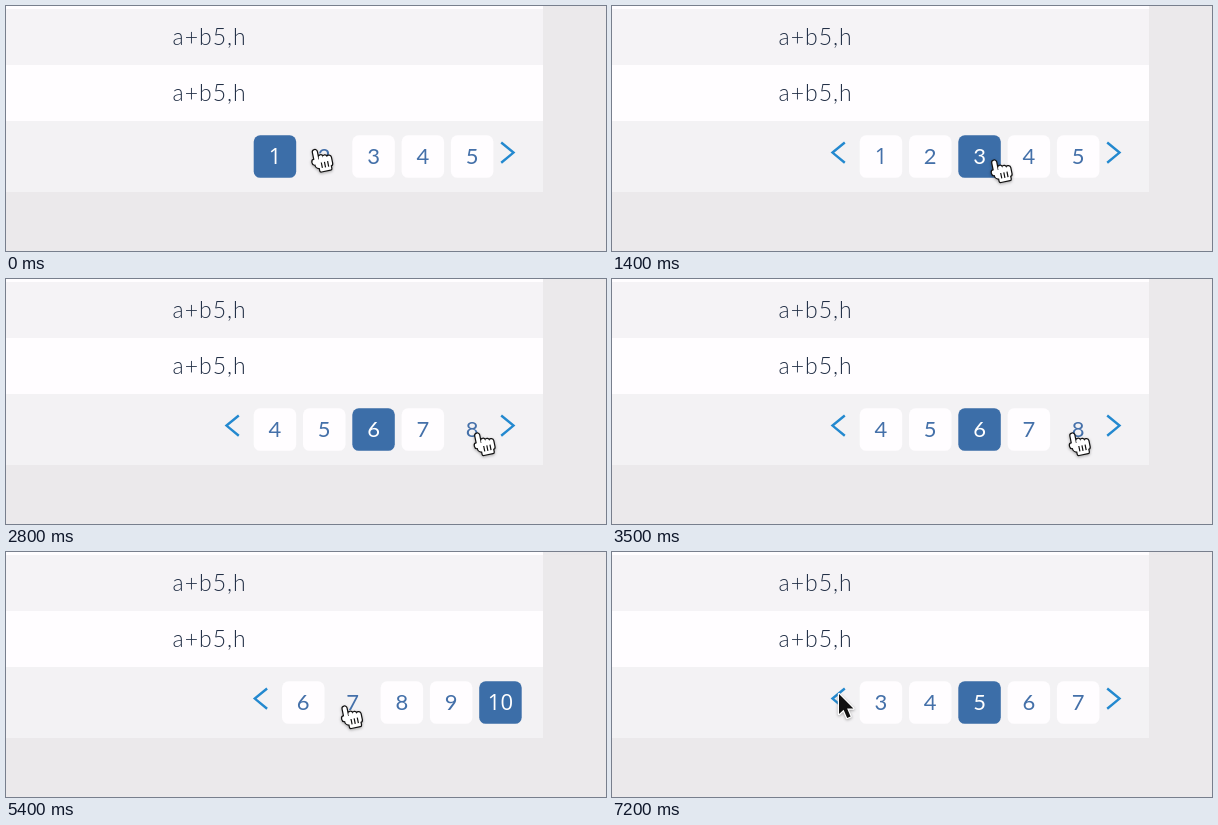
An HTML page with a canvas for the animation above (8000 ms loop, 600x245 px).

```html
<!DOCTYPE html>
<html lang="en">
<head>
<meta charset="utf-8">
<title>Pagination</title>
<style>
html, body { margin: 0; height: 100%; overflow: hidden; background: #ebe9eb; }
canvas { display: block; }
</style>
</head>
<body>
<canvas id="stage" width="600" height="245"></canvas>
<script>
const ctx = document.getElementById('stage').getContext('2d');
const LOOP = 8000, STEP = 100, LAST = 10;
const PITCH = 49.3, SIZE = 42.5, TOP = 129.3;
const WHITE = '#fffdff';

// Clicks: [time, page shown from then on]
const clicks = [[0, 1], [100, 2], [1300, 3], [1900, 4], [2700, 6],
  [3800, 8], [4600, 10], [6000, 6], [7200, 5]];

// Pointer moves: [start, end, x, y]
const moves = [[400, 1100, 371, 154], [1300, 2200, 436.5, 154], [2200, 2500, 474, 154],
  [2700, 3500, 460.5, 154], [4900, 5800, 301.5, 154], [6200, 7000, 227, 142]];

const arrow = new Path2D('M0 0V20L4.6 15.8L8.2 24L11.6 22.5L8.1 14.6H14.4Z');
const hand = new Path2D(), folds = new Path2D();
hand.roundRect(-2.6, 0.5, 3.9, 16, 1.9);    // index finger
hand.roundRect(-5, 9.8, 5, 5, 2.2);         // thumb
hand.roundRect(-2.6, 10.5, 16.6, 8.5, 4);   // palm
hand.roundRect(1, 14, 11.2, 8.8, 1);        // wrist
for (let i = 0; i < 3; i++) {
  hand.roundRect(2 + 4 * i, 6.8 + i, 4, 10, 1.9);
  folds.rect(3 + 3.2 * i, 14, 1.2, 5.5);
}

function rect(x, y, w, h, color) {
  ctx.fillStyle = color;
  ctx.fillRect(x, y, w, h);
}

function text(str, x, y, color, font, align, spacing) {
  ctx.font = font;
  ctx.fillStyle = color;
  ctx.textAlign = align;
  ctx.letterSpacing = spacing;
  ctx.fillText(str, x, y);
}

function pointerAt(t) {
  let x = 309, y = 143.5;
  for (const [start, end, toX, toY] of moves) {
    const k = Math.min(Math.max((t - start) / (end - start), 0), 1);
    const eased = Math.sin(k * Math.PI / 2);
    x += (toX - x) * eased;
    y += (toY - y) * eased;
  }
  return { x, y };
}

function drawTable() {
  rect(0, 0, 600, 245, '#ebe9eb');
  rect(0, 0, 537, 186, '#f3f2f4');
  for (let i = 0; i < 3; i++)
    rect(0, 3 + 56 * (i - 1), 537, 56, i % 2 ? '#f5f3f6' : WHITE);
  for (const y of [38.6, 94.6])
    text('a+b5,h', 166.6, y, '#233047', '300 23px Lato, sans-serif', 'left', '1px');
}

function drawChevron(x, dir) {
  ctx.strokeStyle = '#2389cf';
  ctx.lineWidth = 2.4;
  ctx.lineJoin = 'miter';
  ctx.beginPath();
  ctx.moveTo(x - 6.3 * dir, 136.5);
  ctx.lineTo(x + 6 * dir, 146.6);
  ctx.lineTo(x - 6.3 * dir, 156.7);
  ctx.stroke();
}

function drawPager(page, pointer) {
  const first = Math.min(Math.max(page - 2, 1), LAST - 4);
  const left = page === LAST ? 276 : 247.7;
  for (let i = 0; i < 5; i++) {
    const x = left + i * PITCH, n = first + i, active = n === page;
    const hover = pointer.x >= x && pointer.x < x + SIZE;
    if (active || !hover) {
      ctx.fillStyle = active ? '#3c6ea8' : WHITE;
      ctx.beginPath();
      ctx.roundRect(x, TOP, SIZE, SIZE, 6.5);
      ctx.fill();
    }
    // A plain, footless 1 needs the second family
    const family = /1/.test(n) ? '"Open Sans"' : 'Lato';
    text(n, x + SIZE / 2, 158, active ? '#fff' : '#4470a9', `22px ${family}, sans-serif`, 'center', '0px');
  }
  if (page > 1) drawChevron(left - 21.2, -1);
  if (page < LAST) drawChevron(501.5, 1);
}

function drawShape(shape, fill, outline) {
  ctx.lineJoin = 'round';
  ctx.lineWidth = 2.4;
  ctx.strokeStyle = outline;
  ctx.shadowColor = 'rgba(0,0,0,.35)';
  ctx.stroke(shape);
  ctx.shadowColor = 'transparent';
  ctx.fillStyle = fill;
  ctx.fill(shape);
}

function drawPointer({ x, y }) {
  ctx.save();
  ctx.translate(x, y);
  ctx.shadowBlur = 3;
  ctx.shadowOffsetY = 1;
  if (x >= 246) {
    ctx.rotate(-0.2);
    drawShape(hand, '#fff', '#111');
    ctx.fillStyle = '#111';
    ctx.fill(folds);
  } else {
    drawShape(arrow, '#111', '#fff');
  }
  ctx.restore();
}

function frame() {
  const t = Math.floor(performance.now() % LOOP / STEP) * STEP;
  const page = clicks.findLast(c => c[0] <= t)[1];
  const pointer = pointerAt(t);
  drawTable();
  drawPager(page, pointer);
  drawPointer(pointer);
  requestAnimationFrame(frame);
}
frame();
</script>
</body>
</html>
```
